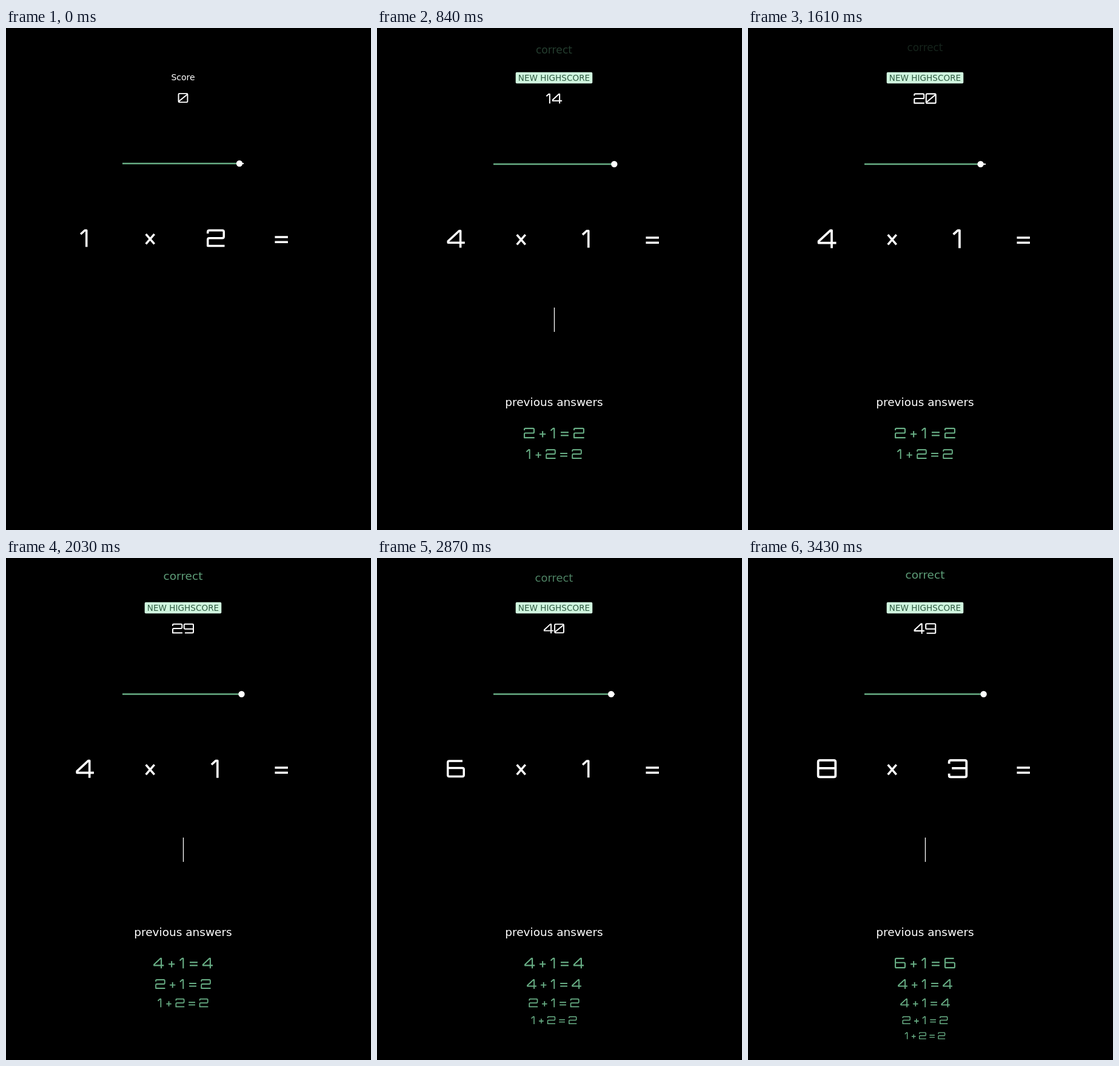
Recreate the animation shown at these times as an HTML page. Size 602 px wide and 826 px high, loop 3500 ms.

```html
<!DOCTYPE html>
<html lang="en">
<head>
<meta charset="utf-8">
<title>Times table game</title>
<style>
  html, body { margin: 0; width: 100%; height: 100%; overflow: hidden; background: #000; }
  svg { display: block; width: 602px; height: 826px; }
  text { font-family: "DejaVu Sans", sans-serif; text-anchor: middle; }
  path { fill: none; stroke-linejoin: round; }
</style>
</head>
<body>
<svg id="stage" viewBox="0 0 602 826"></svg>
<script>
const LOOP = 3500, STEP = 70;
const GREEN = '#68ae85', WHITE = '#fff';
const stage = document.getElementById('stage');

// Square numerals on a 29-unit cap height: [advance, centre line].
const GLYPHS = {
  '0': [30, 'M4.25 1.75H25.75q2.5 0 2.5 2.5V24.75q0 2.5-2.5 2.5H4.25q-2.5 0-2.5-2.5V4.25q0-2.5 2.5-2.5zM3 24.5L27 4.5'],
  '1': [14.5, 'M.4 8L7.2 1.75H10V29'],
  '2': [30, 'M1.75 7V4.25q0-2.5 2.5-2.5H25.75q2.5 0 2.5 2.5V12q0 2.5-2.5 2.5H4.25q-2.5 0-2.5 2.5V27.25H29.5'],
  '3': [30, 'M1.75 7V4.25q0-2.5 2.5-2.5H25.75q2.5 0 2.5 2.5V24.75q0 2.5-2.5 2.5H4.25q-2.5 0-2.5-2.5V22M6 13.7H28'],
  '4': [28, 'M21.5 29V1.75H19.5L1.5 18.5V21H28.5'],
  '5': [30, 'M28 1.75H1.75V12.5H25.75q2.5 0 2.5 2.5V24.75q0 2.5-2.5 2.5H4.25q-2.5 0-2.5-2.5V22'],
  '6': [30, 'M26 1.75H4.25q-2.5 0-2.5 2.5V24.75q0 2.5 2.5 2.5H25.75q2.5 0 2.5-2.5V15.7q0-2.5-2.5-2.5H1.75'],
  '7': [24, 'M.5 1.75H20q2.5 0 2.5 2.5V29'],
  '8': [30, 'M4.25 1.75H25.75q2.5 0 2.5 2.5V24.75q0 2.5-2.5 2.5H4.25q-2.5 0-2.5-2.5V4.25q0-2.5 2.5-2.5zM2 13.7H28'],
  '9': [30, 'M4 27.25H25.75q2.5 0 2.5-2.5V4.25q0-2.5-2.5-2.5H4.25q-2.5 0-2.5 2.5V13.3q0 2.5 2.5 2.5H28.25'],
  '+': [17, 'M0 17.5H17M8.5 9V26'],
  '=': [21.5, 'M0 12.7H21.5M0 21H21.5'],
  'x': [18, 'M2 8L16 24.2M16 8L2 24.2'],
  ' ': [8.4, '']
};
const GAP = 2.5;

// Answer times and the problem shown after each one.
const START = -700;
const ANSWERS = [210, 770, 1680, 2290, 3095];
const PROBLEMS = [[1, 2], [2, 1], [4, 1], [4, 1], [6, 1], [8, 3]];

// Reaction to an answer: [ms, label y, label opacity, label scale, number scale].
const REACT = [
  [0, 38, 0, .9, 1],
  [70, 36, .35, .93, 1.02],
  [190, 10, .9, 1, 1.22],
  [300, 20, .9, 1, 1.2],
  [335, 28, .9, 1, 1.08],
  [350, 30, .9, 1, 1.03],
  [580, 33, .75, .97, 1],
  [840, 33, .2, .91, 1.07],
  [910, 34, 0, .9, 1]
];

// Rows of earlier answers: [centre y, font size].
const ROWS = [[666.5, 24], [701, 22], [732, 20], [760.5, 18], [786, 16]];

function react(ms) {
  const i = REACT.findIndex(k => k[0] > ms);
  if (i < 0) return REACT[REACT.length - 1];
  const a = REACT[i - 1], b = REACT[i];
  const p = (ms - a[0]) / (b[0] - a[0]);
  return a.map((v, j) => v + (b[j] - v) * p);
}

function numerals(str, cx, cy, size, color = WHITE) {
  let x = 0, out = '';
  for (const ch of String(str)) {
    const [w, d] = GLYPHS[ch];
    if (d) out += `<path d="${d}" transform="translate(${x})"/>`;
    x += w + GAP;
  }
  const mid = (x - GAP) / 2;
  return `<g role="img" aria-label="${str}" stroke="${color}" stroke-width="3.5" ` +
    `transform="translate(${cx} ${cy}) scale(${size / 40}) translate(${-mid} -14.5)">${out}</g>`;
}

function words(str, y, size, color) {
  return `<text x="292" y="${y}" font-size="${size}" fill="${color}">${str}</text>`;
}

function slider(y, age) {
  const x = 392 - age / 100;
  return `<path d="M192 ${y}H392" stroke="${WHITE}" stroke-width="2"/>` +
    `<path d="M192 ${y}H${x}" stroke="${GREEN}" stroke-width="2.4"/>` +
    `<circle cx="${x}" cy="${y}" r="5.2" fill="${WHITE}"/>`;
}

function praise(y, opacity, scale) {
  return `<g opacity="${opacity}" transform="translate(292 ${y}) scale(${scale}) translate(-292 0)">` +
    words('correct', 6, 18.5, GREEN) + '</g>';
}

function history(done) {
  let out = words('previous answers', 622, 18.5, WHITE);
  for (let i = 0; i < done; i++) {
    const [a, b] = PROBLEMS[done - 1 - i];
    out += numerals(`${a} + ${b} = ${a * b}`, 292, ...ROWS[i], GREEN);
  }
  return out;
}

function draw(t) {
  const done = ANSWERS.filter(a => a <= t).length;
  const age = t - (done ? ANSWERS[done - 1] : START);
  const [, labelY, opacity, labelScale, pulse] = done ? react(age) : REACT[0];
  const shift = done ? 1 : 0;
  const score = done ? Math.round(done * 10 - 10 * Math.exp(-age / 137)) : 0;
  const [a, b] = PROBLEMS[done];
  const mid = 345.7 + shift;

  let out = done
    ? praise(labelY, opacity, labelScale) +
      '<rect x="228.7" y="72.7" width="126.6" height="18.6" rx="2" fill="#d0f6df"/>' +
      words('NEW HIGHSCORE', 86.8, 13.6, '#2f5a42')
    : words('Score', 85.5, 14, WHITE);

  out += numerals(score, 292, 115 + shift, 22.4 * pulse);
  out += slider(223 + shift, age);
  out += numerals(a, 130, mid, 40 * pulse) + numerals('x', 237.7, mid, 40);
  out += numerals(b, 346, mid, 40 * pulse) + numerals('=', 454.2, mid, 40);
  if (age % 1000 < 500) out += `<path d="M292.5 460V500" stroke="${WHITE}" stroke-width="1.3"/>`;
  if (done) out += history(done);
  stage.innerHTML = out;
}

const begin = performance.now();
let last = -1;
function tick(now) {
  const step = Math.floor(Math.max(0, now - begin) % LOOP / STEP);
  if (step !== last) draw((last = step) * STEP);
  requestAnimationFrame(tick);
}
tick(begin);
</script>
</body>
</html>
```
